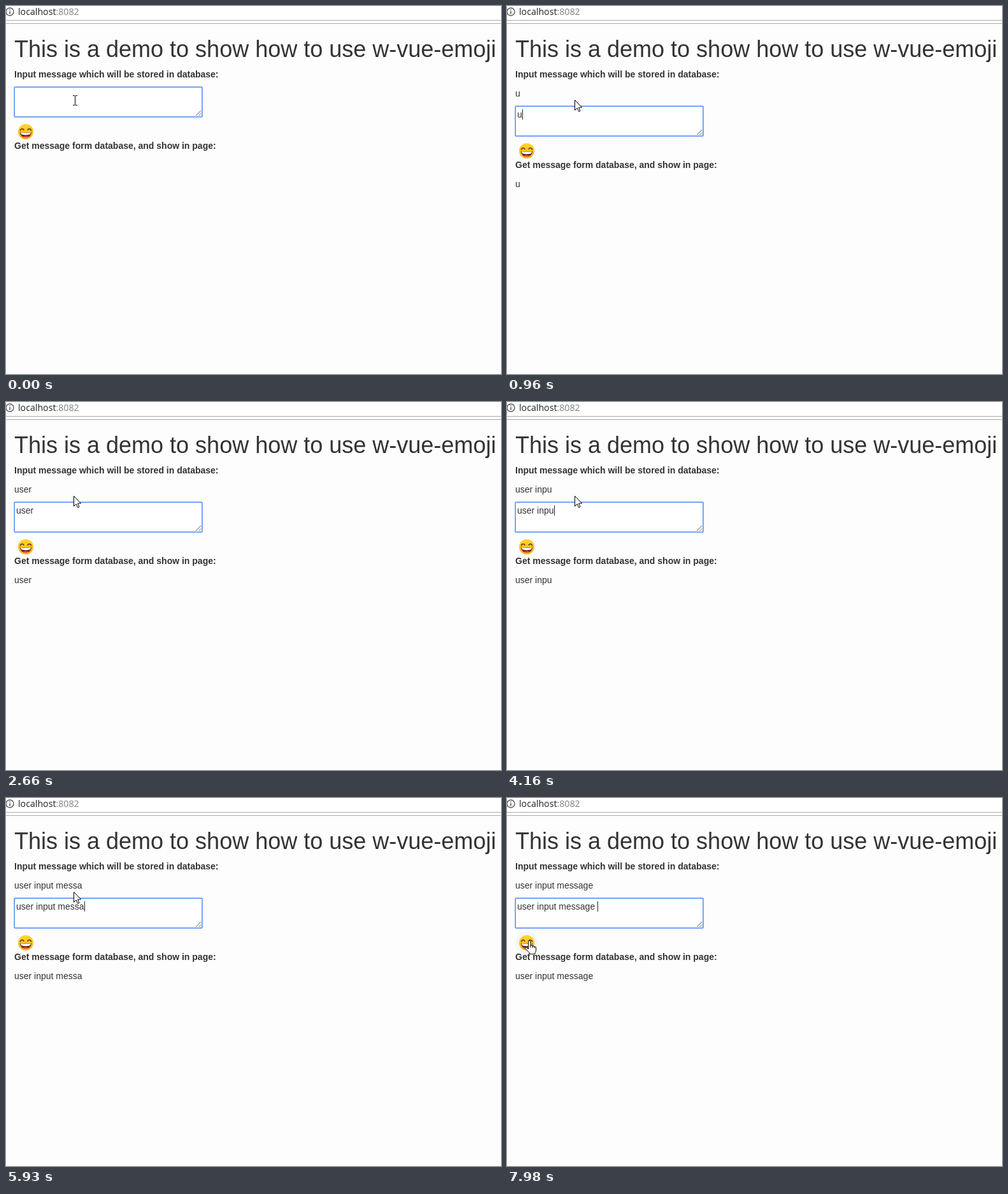
Animation, 777 px wide and 577 px high, one loop 8000 ms. Source, as an HTML page:

```html
<!DOCTYPE html>
<html lang="en">
<head>
<meta charset="utf-8">
<title>w-vue-emoji demo</title>
<style>
  html, body { margin: 0; width: 100%; height: 100%; overflow: hidden; background: #fdfdfd; }
  svg { display: block; width: 777px; height: 577px; }
  text { font: 14px "Liberation Sans", Arial, sans-serif; fill: #333; white-space: pre; }
  .title { font-size: 36px; }
  .label { font-weight: bold; }
  .address { font: 14.2px "Open Sans", "Noto Sans", sans-serif; fill: #222; }
  .port { fill: #808080; }
  .pointer { fill: #fff; stroke: #000; }
</style>
</head>
<body>
<svg viewBox="0 0 777 577">
  <rect width="777" height="27" fill="#fff"/>
  <path d="M0 22.5h777M0 27.5h777" stroke="#a9a9a9"/>
  <circle cx="6" cy="9" r="6" fill="none" stroke="#5a5a5a" stroke-width="1.4"/>
  <path d="M5.2 5.2h1.6v1.6h-1.6zM5.2 8h1.6v4.6h-1.6z" fill="#5a5a5a"/>
  <text class="address" x="19" y="14">localhost<tspan class="port">:8082</tspan></text>

  <text class="title" x="13" y="80">This is a demo to show how to use w-vue-emoji</text>
  <text class="label" x="13" y="112">Input message which will be stored in database:</text>
  <text class="echo" x="13" y="142"></text>

  <g id="form">
    <rect x="12.5" y="126.5" width="296" height="48" rx="1.5" fill="#fff" stroke="#8db4f8"/>
    <rect x="13.5" y="127.5" width="294" height="46" fill="none" stroke="#5f98f5"/>
    <path d="M298 172l8-8M302.500 172l3.500-3.500" stroke="#666" fill="none"/>
    <text id="typed" x="16" y="145"></text>
    <rect id="caret" y="132" width="1" height="16" fill="#222"/>

    <circle id="hover" cx="31" cy="197" r="17.500" fill="#f5f5f5"/>
    <g transform="translate(31 197)">
      <circle r="12" fill="url(#skin)"/>
      <path d="M-8.500-2.200q2.700-4.200 5.400-.6M3.100-2.800q2.700-3.600 5.400.6" fill="none" stroke="#5f3411" stroke-width="1.600" stroke-linecap="round"/>
      <path d="M-9 .6Q0 3 9 .6 8.500 9 0 9T-9 .6z" fill="#6b1d1a"/>
      <path d="M-8 1Q0 3.200 8 1 7.500 4 6.500 4.500 0 5.800-6.500 4.500-7.500 4-8 1z" fill="#fff"/>
      <path d="M-4.500 7.800Q0 4.800 4.500 7.800 0 10-4.500 7.800z" fill="#e2453c"/>
    </g>
    <text class="label" x="13" y="224">Get message form database, and show in page:</text>
    <text class="echo" x="13" y="254"></text>
  </g>

  <path id="beam" d="M0 0h3v1H0zM4 0h3v1H4zM3 1h1v14H3zM0 15h3v1H0zM4 15h3v1H4z"/>
  <path id="arrow" class="pointer" d="M.5.5v16l3.700-3.600 2.500 5.600 2.300-1-2.400-5.500h5z"/>
  <g id="hand" class="pointer">
    <path d="M5.500 13V2.200a1.600 1.600 0 0 1 3.200 0V8q3-1 3.200 1 2.800-.8 3 1.200 2.600-.6 2.600 1.800v4q0 2-1.500 3.500v2.200H7.500v-1.700L1 13.500Q-.2 11 2 11q1.200 0 3.500 3z"/>
    <path d="M8.700 8v3.500M11.900 9v3M14.900 10v2.500" fill="none"/>
  </g>

  <defs>
    <linearGradient id="skin" x2="0" y2="1">
      <stop stop-color="#ffd633"/><stop offset="1" stop-color="#f7ac1c"/>
    </linearGradient>
  </defs>
</svg>
<script>
const LOOP = 8000;
const MESSAGE = "user input message ";
const keyTimes = [960, 1260, 1540, 1820, 2100, 2930, 3200, 3760, 4160, 4280,
                  4400, 5070, 5230, 5660, 5810, 5930, 6180, 6300, 6580];
// The caret toggles at each of these times, starting hidden.
const caretFlips = [310, 840, 960, 2660, 2930, 4920, 5070, 7010, 7590];
const pointerPath = [
  [0, "beam", 105, 140], [960, "arrow", 106, 147], [7440, "beam", 60, 172],
  [7590, "beam", 47, 186], [7740, "arrow", 42, 207], [7860, "hand", 30, 219],
  [7980, "hand", 28, 223]
];

const byId = id => document.getElementById(id);
const show = (el, on) => { el.style.display = on ? "" : "none"; };
const move = (el, x, y) => el.setAttribute("transform", `translate(${x} ${y})`);
const countPast = (times, t) => times.filter(time => time <= t).length;

const typed = byId("typed"), caret = byId("caret");
const echoes = document.querySelectorAll(".echo");

function render(t) {
  const count = countPast(keyTimes, t);
  const text = MESSAGE.slice(0, count);
  typed.textContent = text;
  echoes.forEach(el => { el.textContent = text.trim(); });
  move(byId("form"), 0, count ? 30 : 0);

  show(caret, countPast(caretFlips, t) % 2);
  caret.setAttribute("x", Math.round(16 + (count ? typed.getComputedTextLength() : 0)));

  const [, kind, x, y] = pointerPath.filter(([time]) => time <= t).pop();
  for (const id of ["beam", "arrow", "hand"]) show(byId(id), id === kind);
  move(byId(kind), x, y);
  show(byId("hover"), kind === "hand");
}

function tick() {
  render(performance.now() % LOOP);
  requestAnimationFrame(tick);
}
tick();
</script>
</body>
</html>
```
